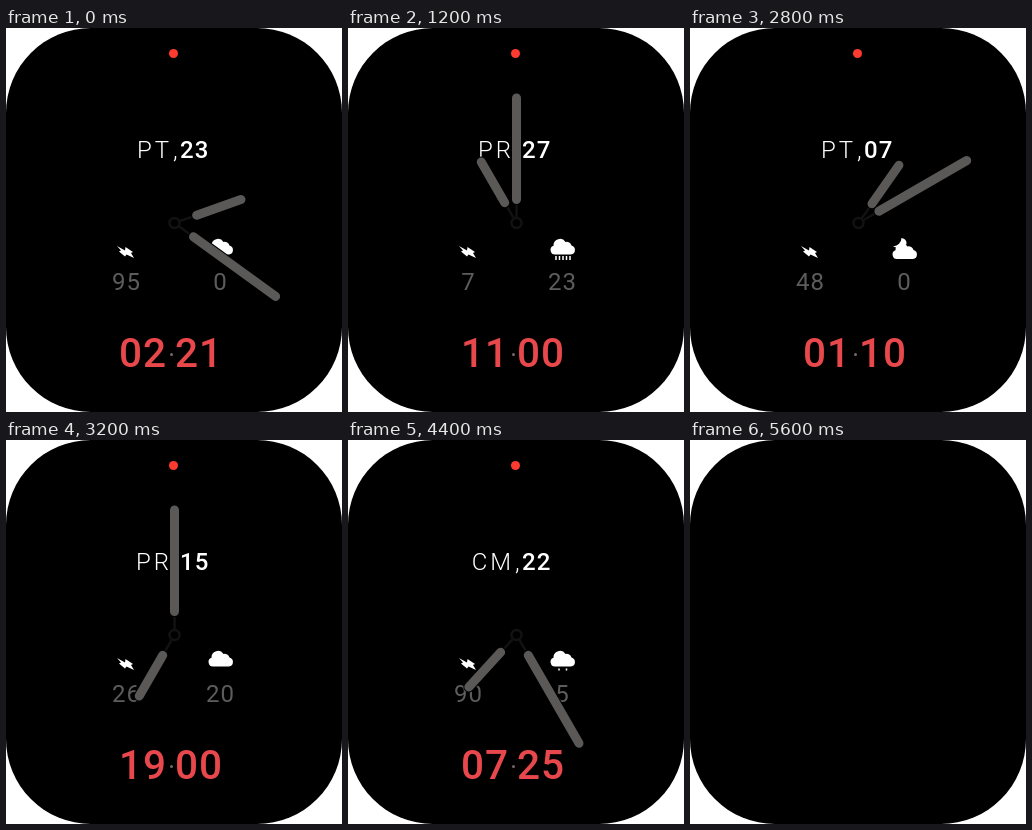
An HTML page for the animation above (8800 ms loop, 336 by 384 pixels).

```html
<!DOCTYPE html>
<html lang="en">
<head>
<meta charset="utf-8">
<title>Watch face</title>
<style>
html, body { margin: 0; width: 100%; height: 100%; overflow: hidden; background: #fff; }
svg { display: block; width: 336px; height: 384px; }
text { font-family: Roboto, Inter, sans-serif; font-kerning: none; }
.day { font-size: 24px; font-weight: 300; letter-spacing: 3px; fill: #fff; text-anchor: end; }
.date { font-size: 24px; font-weight: 500; letter-spacing: 1px; fill: #fff; }
.value { font-size: 24px; letter-spacing: 1px; fill: #5c5c5c; text-anchor: middle; }
.time { font-size: 40.5px; font-weight: 500; letter-spacing: 1px; fill: #e8484c; }
.hand { stroke-linecap: round; stroke: #5a5958; stroke-width: 9; }
.edge { stroke-linecap: round; stroke: #000; stroke-width: 11; }
.hub { fill: none; stroke: #121212; stroke-width: 2.5; }
.icon { fill: #fff; }
.drops { stroke: #fff; stroke-width: 1.5; }
</style>
</head>
<body>
<svg viewBox="0 0 336 384">
  <rect width="336" height="384" rx="85" ry="85"/>
  <g id="face">
    <circle id="dot" cx="167.5" cy="25.5" r="4.5" fill="#ff3b2f"/>
    <text class="day" id="day" x="166" y="130"></text>
    <text class="date" x="167" y="130" style="font-weight:300">,</text>
    <text class="date" id="date" x="174" y="130"></text>
    <path class="icon" d="M111 218L119 222.5L119.5 219L127 224L125 225L128 230L120.5 226.5L119 228.5L113 223.5L115 222.5Z"/>
    <g id="sky"></g>
    <text class="value" id="battery" x="120.5" y="262"></text>
    <text class="value" id="degrees" x="214.5" y="262"></text>
    <text class="time" id="hours" x="113" y="339"></text>
    <circle cx="165.5" cy="326.5" r="1.5" fill="#77676c"/>
    <text class="time" id="minutes" x="169" y="339"></text>
    <g id="hands"></g>
  </g>
</svg>
<script>
const STEP = 400, LOOP = 8800;
const CX = 168.5, CY = 195;

// day, date, battery, degrees, sky, hour, minute, dot
const steps = [
  ['PT', 23, 95, 0, 'cloud', 2, 21, 1],
  ['CM', 14, 100, 5, 'rain3', 10, 35, 0],
  ['PR', 19, 18, 12, 'cloud', 16, 15, 0],
  ['PR', 27, 7, 23, 'rain5', 11, 0, 1],
  ['CT', 11, 54, 15, 'rain3', 5, 39, 1],
  ['CT', 3, 63, 0, 'rain5', 17, 24, 0],
  ['PT', 18, 35, 12, 'rain2', 21, 33, 0],
  ['PT', 7, 48, 0, 'moon', 1, 10, 1],
  ['PR', 15, 26, 20, 'cloud', 19, 0, 1],
  ['CM', 30, 17, 28, 'rain5', 12, 58, 1],
  ['PR', 23, 12, 31, 'rain3', 14, 40, 1],
  ['CM', 22, 90, 5, 'rain2', 7, 25, 1],
  ['PT', 16, 8, 31, 'cloud', 7, 25, 1],
  ['PT', 23, 3, 0, 'cloud', 2, 21, 1]
];

const $ = id => document.getElementById(id);
const two = n => String(n).padStart(2, '0');
const setText = (id, value) => { $(id).textContent = value; };

const cloud = '<path class="icon" d="M207.5 226.5A4.5 4.5 0 0 1 205.5 217.8A6.5 6.5 0 0 1 217.5 214A5 5 0 0 1 223.5 217.5A4.6 4.6 0 0 1 223 226.5Z"/>';
const moon = '<path class="icon" d="M203 218.5Q211 217 211.5 210Q217 211 216.5 216Q212 222 203 218.5Z"/>';

function drops(xs, y1, y2) {
  const d = xs.map(x => `M${x} ${y1}V${y2}`).join('');
  return `<path class="drops" d="${d}"/>`;
}

const skies = {
  cloud,
  rain5: cloud + drops([208, 211.5, 215, 218.5, 222], 228, 232),
  rain3: cloud + drops([208.5, 214.5, 220.5], 228, 231.5),
  rain2: cloud + drops([211, 218.5], 228.5, 230.5),
  moon: moon + `<g transform="translate(0 4.5)">${cloud}</g>`
};

function line(cls, angle, from, to) {
  const a = angle * Math.PI / 180, s = Math.sin(a), c = -Math.cos(a);
  return `<line class="${cls}" x1="${CX + from * s}" y1="${CY + from * c}" x2="${CX + to * s}" y2="${CY + to * c}"/>`;
}

const hand = (angle, length) =>
  line('hub', angle, 6, 19) + line('edge', angle, 23.5, length) + line('hand', angle, 23.5, length);

function show(i) {
  const step = steps[i];
  $('face').style.display = step ? '' : 'none';
  if (!step) return;
  const [day, date, battery, degrees, sky, h, m, dot] = step;
  setText('day', day);
  setText('date', two(date));
  setText('battery', battery);
  setText('degrees', degrees);
  setText('hours', two(h));
  setText('minutes', two(m));
  $('sky').innerHTML = skies[sky];
  $('dot').style.display = dot ? '' : 'none';
  $('hands').innerHTML = `<circle class="hub" cx="${CX}" cy="${CY}" r="5"/>` +
    hand((h % 12) * 30 + m / 2, 70.5) + hand(m * 6, 125);
}

let current = -1;
const start = performance.now();
function tick() {
  const t = (performance.now() - start) % LOOP;
  const i = Math.floor(t / STEP);
  if (i !== current) show(current = i);
  requestAnimationFrame(tick);
}
tick();
</script>
</body>
</html>
```
